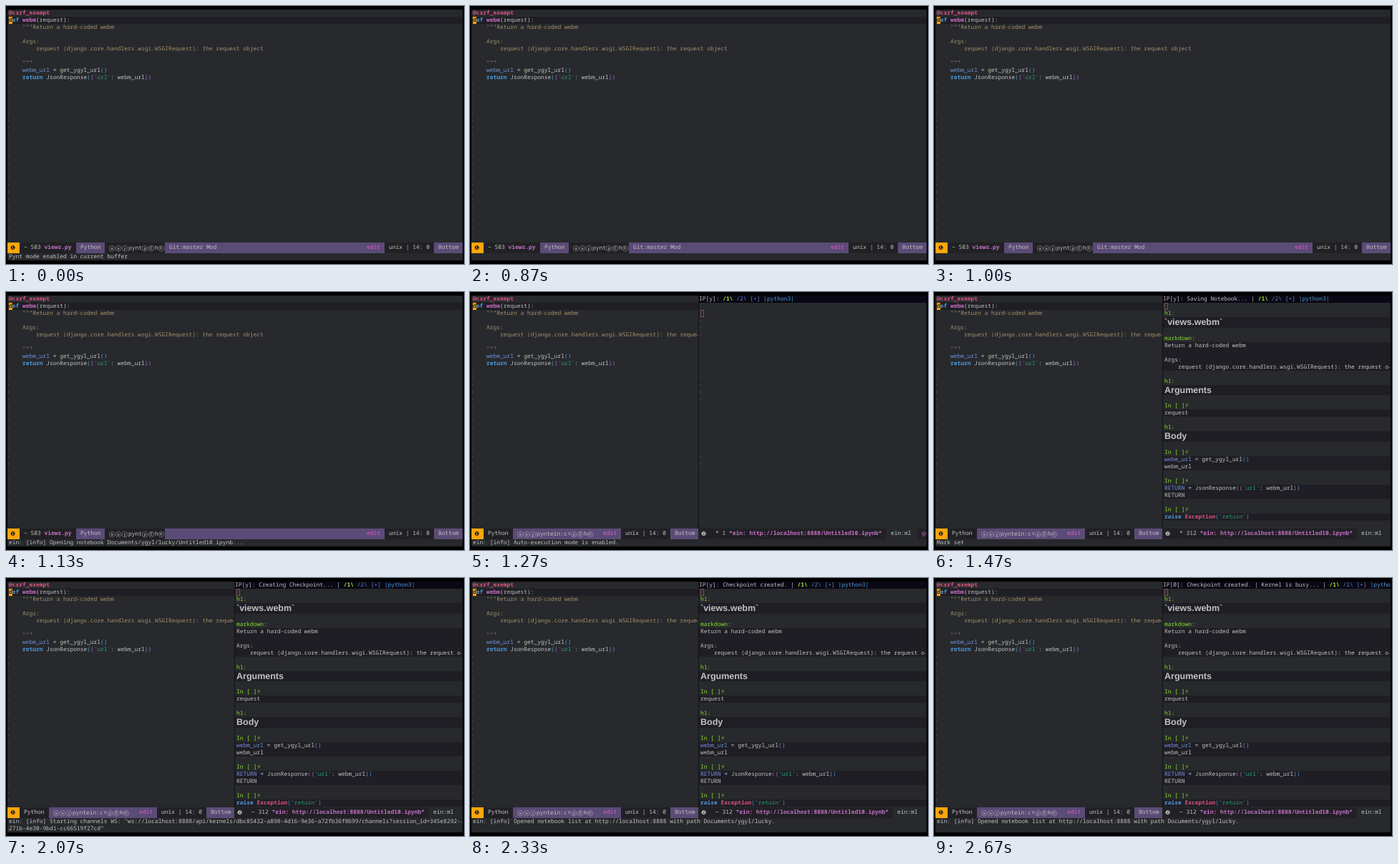
Recreate the animation shown at these times as an HTML page. Size 640 px wide and 360 px high, loop 5.67 s.

```html
<!DOCTYPE html>
<html lang="en">
<head>
<meta charset="utf-8">
<title>Code to notebook</title>
<style>
:root {
  --bg: #27292c; --dark: #1f1e24; --bar: #212125; --violet: #5b4b77;
  --text: #c2c2c2; --blue: #4f9bdc; --var: #7590db; --pink: #c56ec3;
  --doc: #a68e6c; --green: #86dc2f; --str: #2d9a78; --brace: #ab62b4;
  --gold: #ffa50a;
}
html, body { margin: 0; width: 100%; height: 100%; overflow: hidden; background: #000; }
#stage {
  position: absolute; left: 0; top: 0; width: 640px; height: 360px; overflow: hidden;
  background: #000; color: var(--text);
  font: 7.923px/10px "Noto Sans Mono", "DejaVu Sans Mono", monospace;
  text-rendering: geometricPrecision; white-space: pre;
  font-variant-ligatures: none;
}
#stage div, .s, .x { position: absolute; box-sizing: border-box; }
pre { margin: 0; font: inherit; }
b { font-weight: 700; }
i { font-style: normal; }
.k { color: var(--blue); font-weight: 700; }
.f { color: var(--pink); font-weight: 700; }
.v { color: var(--var); }
.p { color: var(--blue); }
.c { color: var(--brace); }
.q { color: var(--str); }
.d { color: var(--doc); }
.g { color: var(--green); }
.sym { font-family: "DejaVu Sans", sans-serif; }
.ring { font-family: "DejaVu Sans", sans-serif; font-size: 8px; letter-spacing: .85px; }

#stage .pane { top: 5px; height: 350px; overflow: hidden; background: var(--bg); }
#stage .hl { left: 0; top: 10px; width: 100%; height: 10px; background: var(--dark); }
#stage .code { left: 2px; top: 0; }
.cur { background: var(--gold); color: #222; font-weight: 700; }
#stage .tilde {
  width: 3px; white-space: normal; word-break: break-all;
  font-size: 6px; color: #5a6678;
}
.arrow { font-size: 5px; color: var(--text); }
#stage .box { left: 2px; width: 5px; height: 10px; border: 1px solid #84504a; }

/* mode line */
#stage .ml { height: 15px; line-height: 15px; overflow: hidden; background: var(--bar); }
.s { top: 0; height: 15px; padding-left: 6px; background: var(--bar); }
.s.w { background: var(--violet); }
.s.n { background: var(--gold); color: #2b2620; padding-left: 4px; }
.x { top: 0; }
.edit { color: #dc5cc4; }

#stage .echo { left: 2px; top: 345px; width: 636px; height: 10px; padding-left: 2px; background: var(--bg); }
#stage .echo.two { top: 335px; height: 20px; }

/* notebook */
#stage .head { left: 0; top: 0; width: 319px; height: 10px; padding-left: 1px; background: #0a0814; overflow: hidden; }
.head b { color: #a5e02c; }
.head i { color: #5f83d6; }
.head u { color: var(--blue); text-decoration: none; }
#stage .cells { left: 1px; top: 10px; width: 318px; height: 315px; background: var(--bg); }
.cells pre { position: relative; padding-left: 2px; height: 10px; }
.cells .in { background: var(--dark); }
.cells .h {
  height: 14.7px; background: var(--dark);
  font: 700 12.5px/14.7px "Liberation Sans", Arial, sans-serif;
}

/* each layer switches on at its time within the loop */
.t { animation: 5670ms step-end infinite; }
.t870  { animation-name: t870; }
.t1070 { animation-name: t1070; }
.t1130 { animation-name: t1130; }
.t1270 { animation-name: t1270; }
.t1400 { animation-name: t1400; }
.t1470 { animation-name: t1470; }
.t2070 { animation-name: t2070; }
.t2130 { animation-name: t2130; }
.t2330 { animation-name: t2330; }
.t2670 { animation-name: t2670; }
.lift  { animation-name: lift; }
@keyframes t870  { 0% { opacity: 0 } 15.343%, 100% { opacity: 1 } }
@keyframes t1070 { 0% { opacity: 1 } 18.871%, 100% { opacity: 0 } }
@keyframes t1130 { 0% { opacity: 0 } 19.929%, 100% { opacity: 1 } }
@keyframes t1270 { 0% { opacity: 0 } 22.398%, 100% { opacity: 1 } }
@keyframes t1400 { 0% { opacity: 0 } 24.691%, 100% { opacity: 1 } }
@keyframes t1470 { 0% { opacity: 0 } 25.925%, 100% { opacity: 1 } }
@keyframes t2070 { 0% { opacity: 0 } 36.507%, 100% { opacity: 1 } }
@keyframes t2130 { 0% { opacity: 0 } 37.566%, 100% { opacity: 1 } }
@keyframes t2330 { 0% { opacity: 0 } 41.093%, 100% { opacity: 1 } }
@keyframes t2670 { 0% { opacity: 0 } 47.089%, 100% { opacity: 1 } }
@keyframes lift  { 0% { transform: none } 36.507%, 100% { transform: translateY(-10px) } }
</style>
</head>
<body>
<div id="stage"><div class="pane" style="left:2px;width:636px"><div class="hl"></div><div class="code"><pre><b style="color:#dc5282">@csrf_exempt</b>
<span class="cur">d</span><span class="k">ef</span> <span class="f">webm</span>(request):
<span class="d">    """Return a hard-coded webm

    Args:
        request (django.core.handlers.wsgi.WSGIRequest): the request object

    """</span>
    <span class="v">webm_url</span> = get_ygyl_url<span class="p">()</span>
    <span class="k">return</span> JsonResponse<span class="p">(</span><span class="c">{</span><span class="q">'url'</span>: webm_url<span class="c">}</span><span class="p">)</span></pre></div><div class="tilde" style="left:0;top:100px">~~~~~~~~~~~~~~~~~~~~~~</div></div>

<div class="ml" style="left:2px;top:330px;width:636px"><span class="s n" style="left:0;width:17px"><i class="ring">❶</i></span><span class="s" style="left:17px;width:79px">− 503 <b class="f">views.py</b></span><span class="s w" style="left:96px;width:40px">Python</span><span class="s" style="left:136px;width:84px"><i class="ring">ⓐⓐⓨ</i>pynt<i class="ring">ⓟⒺ</i>h<i class="ring">Ⓚ</i></span><span class="s w" style="left:220px;width:307px"><span class="t t1070">Git:master Mod</span></span><span class="x edit" style="left:502px">edit</span><span class="s" style="left:527px;width:69px">unix | 14: 0</span><span class="s w" style="left:596px;width:40px">Bottom</span></div>

<div class="echo">Pynt mode enabled in current buffer</div>
<div class="echo t t870"></div>
<div class="echo t t1130">ein: [info] Opening notebook Documents/ygyl/lucky/Untitled10.ipynb...</div>

<div class="t t1270" style="left:0;top:0;width:640px;height:360px">
<div class="arrow" style="left:317px;top:55px;width:2px;height:10px;background:var(--bg)"><span class="x" style="left:-1px">→</span></div>
<div class="pane" style="left:319px;width:319px"><div class="box" style="left:3px;top:20px"></div><div class="tilde" style="left:2px;top:30px">~~~~~~~~~~~~~~~~~~~~~~~~~~~~~</div><div class="head">IP[y]: <b>/1\</b> <i>/2\</i> <i>[+]</i> <u>|python3|</u></div><div class="cells t t1400"><div class="box" style="top:0"></div><pre> </pre><pre class="g">h1:</pre><pre class="h">`views.webm`</pre><pre> </pre><pre class="g">markdown:</pre><pre class="in">Return a hard-coded webm</pre><pre class="in"> </pre><pre class="in">Args:</pre><pre class="in">    request (django.core.handlers.wsgi.WSGIRequest): the request o<span class="x arrow" style="left:314px">→</span></pre><pre> </pre><pre class="g">h1:</pre><pre class="h">Arguments</pre><pre> </pre><pre class="g">In [ ]<i class="sym">⚡</i></pre><pre class="in">request</pre><pre> </pre><pre class="g">h1:</pre><pre class="h">Body</pre><pre> </pre><pre class="g">In [ ]<i class="sym">⚡</i></pre><pre class="in"><span class="v">webm_url</span> = get_ygyl_url<span class="p">()</span></pre><pre class="in">webm_url</pre><pre> </pre><pre class="g">In [ ]<i class="sym">⚡</i></pre><pre class="in"><span class="v">RETURN</span> = JsonResponse<span class="p">(</span><span class="c">{</span><span class="q">'url'</span>: webm_url<span class="c">}</span><span class="p">)</span></pre><pre class="in">RETURN</pre><pre> </pre><pre class="g">In [ ]<i class="sym">⚡</i></pre><pre class="in"><span class="k">raise</span> <b style="color:#dc5282">Exception</b><span class="p">(</span><span class="q">'return'</span><span class="p">)</span></pre></div><div class="head t t1470">IP[y]: Saving Notebook... | <b>/1\</b> <i>/2\</i> <i>[+]</i> <u>|python3|</u></div><div class="head t t2070">IP[y]: Creating Checkpoint... | <b>/1\</b> <i>/2\</i> <i>[+]</i> <u>|python3|</u></div><div class="head t t2130">IP[y]: Checkpoint created. | <b>/1\</b> <i>/2\</i> <i>[+]</i> <u>|python3|</u></div><div class="head t t2670">IP[0]: Checkpoint created. | Kernel is busy... | <b>/1\</b> <i>/2\</i> <i>[+]</i> <u>|python3|</u></div><div style="left:0;top:0;width:1px;height:325px;background:#131316"></div></div>

<div class="echo">ein: [info] Auto-execution mode is enabled.</div>
<div class="echo t t1470">Mark set</div>
<div class="echo two t t2070">ein: [info] Starting channels WS: "ws://localhost:8888/api/kernels/dbc85432-a898-4d16-9e36-a72fb36f8699/channels?session_id=345e8292-
271b-4e30-9bd1-cc66519f27cd"<span class="x arrow" style="left:633px">→</span><span class="x arrow" style="left:-1px;top:10px">→</span></div>
<div class="echo two t t2330">ein: [info] Opened notebook list at http://localhost:8888 with path Documents/ygyl/lucky.</div>

<div class="ml t lift" style="left:2px;top:330px;width:636px"><span class="s n" style="left:0;width:17px"><i class="ring">❶</i></span><span class="s" style="left:17px;width:41px">Python</span><span class="s w" style="left:58px;width:151px"><i class="ring">ⓐⓐⓨ</i>pyntein:c<i class="sym">⚡</i><i class="ring">ⓟⒺ</i>h<i class="ring">Ⓚ</i></span><span class="x edit" style="left:184px">edit</span><span class="s" style="left:209px;width:69px">unix | 14: 0</span><span class="s w" style="left:278px;width:39px">Bottom</span><span class="s" style="left:317px;width:18px;padding-left:4px"><i class="ring">❷</i></span><span class="s" style="left:335px;width:245px">* 1 <b class="f">*ein: http://localhost:8888/Untitled10.ipynb*</b></span><span class="s" style="left:580px;width:43px;background:var(--bg)">ein:ml</span><span class="s f" style="left:623px;width:13px;font-weight:400">go</span><span class="s t t1470" style="left:335px;width:254px">* 312 <b class="f">*ein: http://localhost:8888/Untitled10.ipynb*</b></span><span class="s t t1470" style="left:589px;width:47px;background:var(--bg)">ein:ml</span><span class="s t t2070" style="left:341px;width:5px;padding:0">−</span></div>
</div>
</div>
</body>
</html>
```
